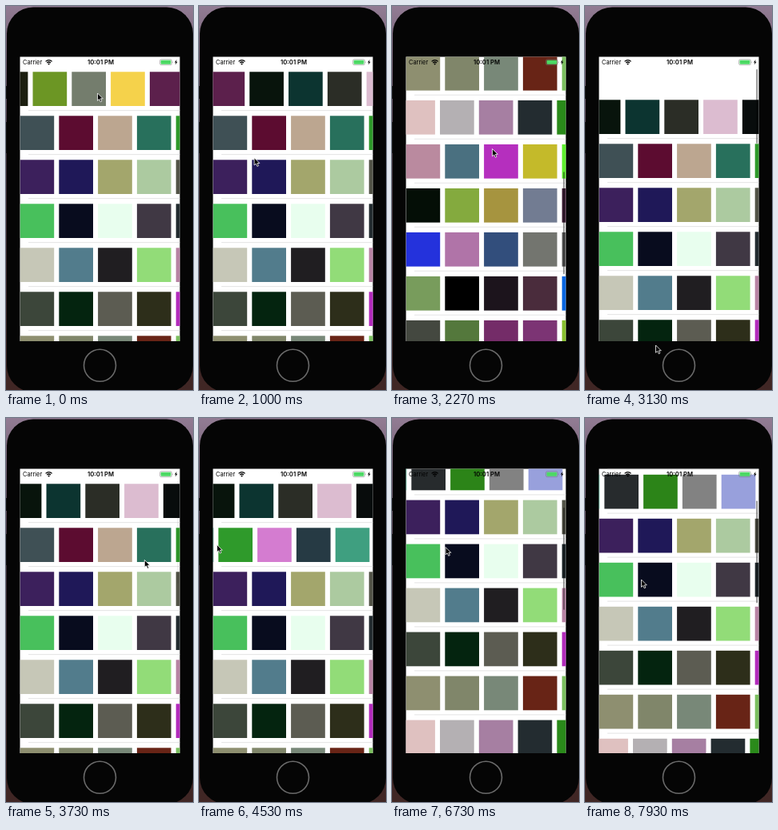
Write an HTML page that moves like this. It is 234 by 480 pixels and loops after 8000 ms.

```html
<!DOCTYPE html>
<html lang="en">
<head>
<meta charset="utf-8">
<title>Colour rows</title>
<style>
  html, body { margin: 0; width: 100%; height: 100%; overflow: hidden; background: #050505; }
  svg { display: block; width: 100vw; height: 100vh; }
  text { font: 7.4px Inter, Roboto, sans-serif; }
  .time { font-size: 7.7px; font-weight: 600; text-anchor: middle; }
</style>
</head>
<body>
<svg viewBox="0 0 234 480" xmlns="http://www.w3.org/2000/svg">
  <defs>
    <linearGradient id="wall" x2="0" y2="1">
      <stop stop-color="#927c94"/>
      <stop offset=".4" stop-color="#3a2c36"/>
      <stop offset="1" stop-color="#402624"/>
    </linearGradient>
    <clipPath id="screen"><rect x="17.5" y="63.4" width="200" height="355.6"/></clipPath>
  </defs>
  <rect width="234" height="480" fill="url(#wall)"/>
  <path d="M0 100h2v16H0zM0 145h2v39H0z" fill="#111"/>
  <rect x="1" y="1.5" width="233" height="481" rx="33" fill="#050505"/>
  <circle cx="117.5" cy="449.3" r="20" fill="none" stroke="#6a6a6a" stroke-width="1.6"/>
  <g clip-path="url(#screen)">
    <rect x="17" y="63" width="201" height="356" fill="#fff"/>
    <g id="table"></g>
    <rect id="bar" x="214.3" width="1.7" rx=".8" fill-opacity=".45"/>
    <text x="21" y="73">Carrier</text>
    <text x="118.6" y="73" class="time">10:01 PM</text>
    <path d="M49.6 69.4a5.6 5.6 0 0 1 8 0M51.2 71.2a3.4 3.4 0 0 1 4.8 0" fill="none" stroke="#000" stroke-width="1.2"/>
    <path d="M52.3 72.3a1.8 1.8 0 0 1 2.6 0l-1.3 1.5z"/>
    <rect x="192.6" y="66.7" width="14.8" height="7" rx="1.7" fill="none" stroke="#777" stroke-width=".5"/>
    <rect x="193.6" y="67.7" width="12.8" height="5" rx=".9" fill="#4cd964"/>
    <path d="M208.1 69.2q1 1 0 2z" fill="#777"/>
    <path d="M213.6 67l-2.6 3.6h1.6l-.8 3 2.8-3.8h-1.6z"/>
  </g>
  <path id="cursor" d="M0 0V9.3L2.2 7.4 3.8 10.8 5.4 10 3.9 6.8H6.8Z" stroke="#fff" stroke-width=".8"/>
</svg>
<script>
const LOOP = 8000, PITCH = 48.8, ROW = 55, SIZE = 42.7, LEFT = 17.5;
const $ = id => document.getElementById(id);

const rows = [
  '1c1f10 6c9624 747d6d f5d24b 5c204c 08140c 0c3430 2b2d26 dcbcd0 080c0c',
  '3f5055 5c0c30 bca690 28705c 2f9a2b d47cd0 263a44 3f9f80 272b2d 2c8418 828282 98a0dc',
  '3c205c 1f1858 a3a66c accaa0 535448',
  '48c05c 080c1e e8feee 403844 232c30',
  'c6c7b7 527c8c 201e21 92dc78 b884a4',
  '3c463a 04240f 5c5c52 2d2e1a b32cbc',
  '8e8f70 80866a 788878 682416 7cc060',
  'dfc1c0 b4b0b3 a67fa2 232c30 2a8a1a',
  '0c0804 ba8a9f 4a7080 b52fbe c4ba2a 60f030',
  '040e06 84aa3e a6943f 727c92 44233c',
  '2432dc b074a8 324e7c 73756f 606060',
  '789c5c 000000 1c141c 4a2c3c 0a66e0',
  '444840 54783c 742c68 7c3474 88c030'
];

// Eased progress from 0 to 1 between two times
const ease = (t, from, to) => {
  const u = Math.min(1, Math.max(0, (t - from) / (to - from)));
  return u * u * (3 - 2 * u);
};

// Flick down the list, throw it back past the top, let it spring; then a short scroll
const scrollAt = t =>
  365 * ease(t, 1150, 2040) - 400 * ease(t, 2155, 3130) + 35 * ease(t, 3150, 3650)
  + 112.5 * ease(t, 6070, 7000) - 46 * ease(t, 7000, 7930);

const barAlpha = t =>
  ease(t, 1180, 1230) - ease(t, 3500, 3800) + ease(t, 6070, 6130);

// Left edge of the first cell in rows that move sideways or rest off the grid
const rowLeft = {
  0: t => -15.3 - 227 * ease(t, 330, 1350),
  1: t => LEFT - 188.4 * ease(t, 3850, 4500) - 4 * PITCH * ease(t, 4700, 5750),
  7: () => 11.2,
  8: t => LEFT - PITCH * ease(t, 1400, 1900)
};

// Pointer stops: time, x, y
const stops = [
  [330, 114.5, 109], [850, 25, 112], [1180, 126, 290], [1530, 126, 156],
  [2270, 125.5, 178.5], [2900, 88.5, 424], [3130, 88.5, 424], [3850, 180, 158],
  [4450, -12, 158], [4750, 180, 160], [5250, 20, 160], [5800, 67, 251],
  [6070, 67, 251], [6730, 67, 161.5], [7930, 70.5, 202]
];

function pointerAt(t) {
  const i = stops.findIndex(s => s[0] > t);
  if (i < 1) return stops.at(i).slice(1);
  const [a, b] = [stops[i - 1], stops[i]], u = ease(t, a[0], b[0]);
  return [1, 2].map(k => a[k] + (b[k] - a[k]) * u);
}

$('table').innerHTML = rows.map((list, r) => {
  const top = 76 + r * ROW;
  const cells = list.split(' ').map((c, i) =>
    `<rect x="${i * PITCH}" y="${top + 6.3}" width="${SIZE}" height="${SIZE}" fill="#${c}"/>`);
  return `<g id="row${r}" transform="translate(${LEFT})">${cells.join('')}</g>
    <path d="M28 ${top + ROW - .4}H218" stroke="#d8d8da" stroke-width=".7"/>`;
}).join('');

const move = (id, x, y) => $(id).setAttribute('transform', `translate(${x} ${y})`);

function draw(now) {
  const t = now % LOOP, scroll = scrollAt(t), bar = $('bar');
  move('table', 0, -scroll);
  for (const r in rowLeft) move('row' + r, rowLeft[r](t), 0);
  move('cursor', ...pointerAt(t));
  bar.setAttribute('y', 79 + .367 * Math.max(scroll, 0));
  bar.setAttribute('height', 128 + Math.min(scroll, 0));
  bar.setAttribute('opacity', barAlpha(t));
  requestAnimationFrame(draw);
}
draw(performance.now());
</script>
</body>
</html>
```
